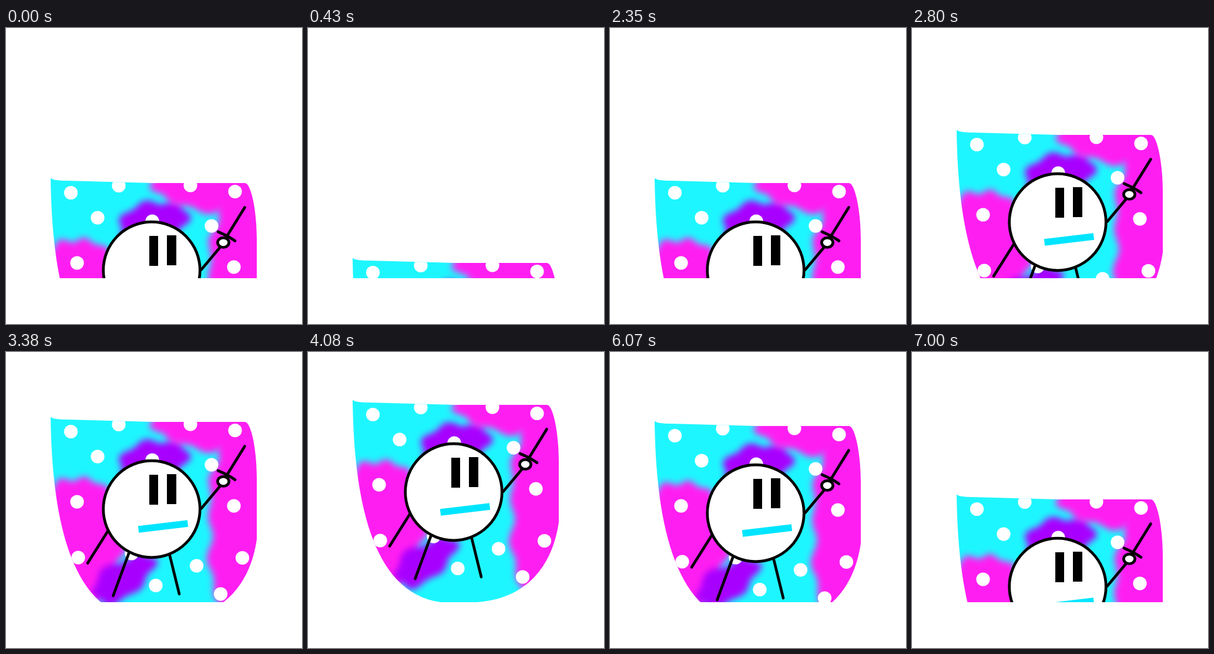
Write an HTML page with a canvas that moves like this. It is 504 px wide and 504 px high and loops after 7070 ms.

```html
<!DOCTYPE html>
<html lang="en">
<head>
<meta charset="utf-8">
<title>Rising badge</title>
<style>
  html, body { margin: 0; width: 100%; height: 100%; overflow: hidden; background: #fff; }
  canvas { display: block; width: 504px; height: 504px; }
</style>
</head>
<body>
<canvas id="stage" width="504" height="504"></canvas>
<script>
const SIZE = 504, FLOOR = 426;
const LOOP = 7070, RISE = 1750, FALL = 5270, TOP = 42;
const CYAN = '#1ef6ff', PINK = '#ff1ef2', PURPLE = '#a800ff';
const ctx = document.getElementById('stage').getContext('2d');

// Poses tick faster the lower the badge sits.
const tick = (pose, slowFrom) => pose > 30 ? 100 : pose >= slowFrom ? 70 : 30;

// Start time of each pose, up and then down again.
function buildTimeline() {
  const steps = [];
  let t = RISE;
  for (let pose = 0; pose <= TOP; pose++) {
    steps.push({ t, pose });
    t += tick(pose, 21);
  }
  t = FALL;
  for (let pose = TOP - 1; pose >= -1; pose--) {
    steps.push({ t, pose });
    t += tick(pose, 20);
  }
  return steps;
}

const timeline = buildTimeline();

function poseAt(t) {
  const time = t < RISE ? t + LOOP : t;
  return timeline.findLast(step => step.t <= time).pose;
}

// Eased drop below the resting place.
function dropAt(pose) {
  return Math.round(173.3 * (1 - Math.cos(Math.PI * (TOP + 0.6 - pose) / 45)));
}

function layer() {
  const c = document.createElement('canvas');
  c.width = c.height = SIZE;
  return c.getContext('2d');
}

// Tilted ellipse with a rippled edge.
function patch(g, color, x, y, rx, ry, tilt = 0) {
  const waves = Math.round((rx + ry) / 15);
  g.save();
  g.translate(x, y);
  g.rotate(tilt);
  g.beginPath();
  for (let a = 0; a < 2 * Math.PI; a += 0.02) {
    const ripple = 4 * Math.sin(waves * a) + 3 * Math.cos((waves >> 1) * a);
    g.lineTo((rx + ripple) * Math.cos(a), (ry + ripple) * Math.sin(a));
  }
  g.fillStyle = color;
  g.fill();
  g.restore();
}

function line(g, x1, y1, x2, y2) {
  g.beginPath();
  g.moveTo(x1, y1);
  g.lineTo(x2, y2);
  g.stroke();
}

function disc(g, x, y, rx, ry = rx) {
  g.beginPath();
  g.ellipse(x, y, rx, ry, 0, 0, 7);
  g.fill();
}

function paintCloth() {
  const g = layer();
  g.fillStyle = CYAN;
  g.fillRect(0, 0, SIZE, SIZE);
  g.filter = 'blur(6px)';
  patch(g, PURPLE, 250, 160, 60, 38, -0.3);
  patch(g, PINK, 123, 292, 76, 108);
  patch(g, PURPLE, 200, 357, 60, 30, -0.6);
  patch(g, PINK, 345, 90, 95, 46);
  patch(g, PINK, 430, 270, 84, 240);
  return g.canvas;
}

function outline() {
  const p = new Path2D();
  p.moveTo(76, 81.5);
  p.quadraticCurveTo(80, 86, 104, 86);
  p.lineTo(250, 90);
  p.lineTo(407, 90);
  p.bezierCurveTo(418, 91, 427, 140, 427, 185);
  p.lineTo(427, 290);
  p.bezierCurveTo(416, 365, 372, 420, 288, 426);
  p.lineTo(226, 426);
  p.bezierCurveTo(105, 410, 78, 240, 76, 81.5);
  return p;
}

function paintDots(g) {
  const dots = [
    [110.5, 106.5], [192, 94.5], [314, 94], [390, 104.5], [156, 149],
    [249, 155], [350, 163], [121, 226], [388, 233], [123, 321],
    [402.5, 321.5], [324.5, 335], [255, 368.5], [365.5, 383], [214, 314]
  ];
  g.fillStyle = '#fff';
  for (const [x, y] of dots) disc(g, x, y, 11.6);
}

function paintFigure(g) {
  g.fillStyle = '#fff';
  g.strokeStyle = '#000';
  g.lineCap = 'round';
  g.lineWidth = 4.7;
  disc(g, 248, 238.5, 82.3);
  g.stroke();

  // limbs and blade
  line(g, 174, 275, 139, 330.5);
  line(g, 209, 314, 182.5, 386);
  line(g, 279, 318, 295, 383);
  line(g, 332.5, 237.5, 364, 200);
  line(g, 374, 184, 406.5, 131.5);

  // guard and hand
  g.beginPath();
  g.moveTo(361, 173);
  g.quadraticCurveTo(378, 180, 390, 188.5);
  g.stroke();
  disc(g, 370, 191.3, 9.6, 8.2);
  g.stroke();

  // eyes
  g.fillStyle = '#000';
  g.fillRect(244, 180, 15, 51);
  g.fillRect(274, 179, 16, 51);

  // mouth
  g.lineCap = 'butt';
  g.lineWidth = 11.5;
  g.strokeStyle = '#00e5ff';
  line(g, 225.5, 273, 309.5, 263);
}

function paintBadge() {
  const g = layer();
  g.save();
  g.clip(outline());
  g.drawImage(paintCloth(), 0, 0);
  paintDots(g);
  g.restore();
  paintFigure(g);
  return g.canvas;
}

const badge = paintBadge();

function draw(time) {
  const pose = poseAt(time % LOOP);
  ctx.fillStyle = '#fff';
  ctx.fillRect(0, 0, SIZE, SIZE);
  if (pose < 0) return;
  ctx.save();
  ctx.beginPath();
  ctx.rect(0, 0, SIZE, FLOOR);
  ctx.clip();
  ctx.drawImage(badge, 0, dropAt(pose) - 1);
  ctx.restore();
}

const begin = performance.now();
function loop() {
  draw(performance.now() - begin);
  requestAnimationFrame(loop);
}
loop();
</script>
</body>
</html>
```
